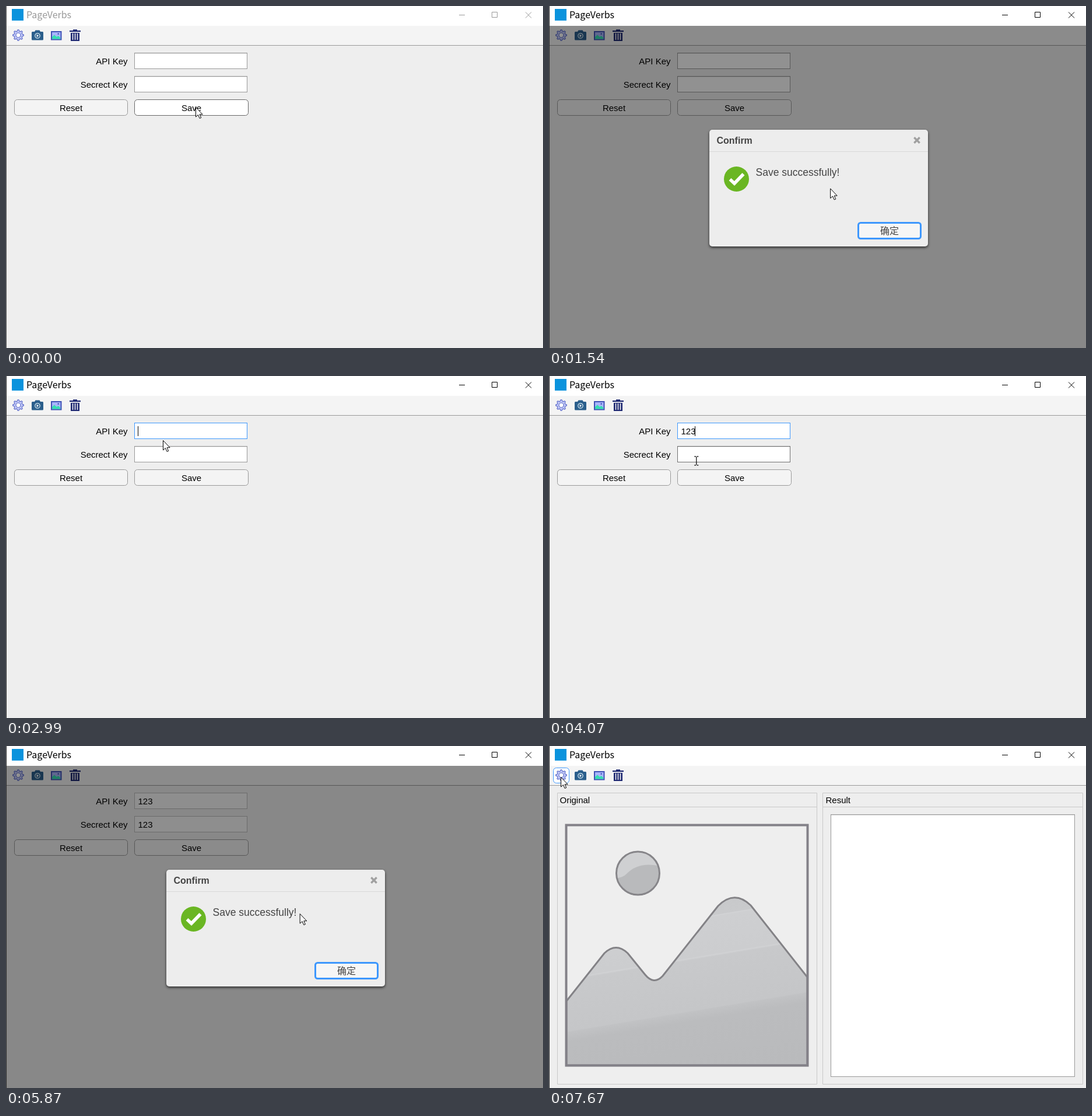
These frames come from a looping animation (921 by 586 pixels, 8 s). An HTML page:

```html
<!DOCTYPE html>
<html lang="en">
<head>
<meta charset="utf-8">
<title>PageVerbs</title>
<style>
  html, body { margin: 0; width: 100%; height: 100%; overflow: hidden; background: #eee; }
  svg { display: block; width: 100%; height: 100%; }
  text { font: 15px "Liberation Sans", Arial, sans-serif; fill: #000; white-space: pre; }
  .title { font: 16px "Noto Sans CJK SC", "Noto Sans CJK", "Noto Sans", sans-serif; }
  .mid { text-anchor: middle; }
  .end { text-anchor: end; }
  #dialog text { fill: #444; }
  #dialog .head { font-size: 16px; font-weight: bold; }
  #dialog .msg { font-size: 17.5px; }
  #dialog .ok { font: 16px "Noto Sans CJK SC", "Noto Sans CJK", sans-serif; }
  #dialog .box { filter: drop-shadow(0 2px 2px rgba(0, 0, 0, .7)); }
  .group { fill: none; stroke: #c8c8c8; }
</style>
</head>
<body>
<svg viewBox="0 0 921 586" xmlns="http://www.w3.org/2000/svg">
  <defs>
    <linearGradient id="hill" gradientUnits="userSpaceOnUse" x1="0" y1="260" x2="57.8" y2="610.5">
      <stop offset="0" stop-color="#c5c6c8"/>
      <stop offset=".21" stop-color="#c9cacc"/>
      <stop offset=".214" stop-color="#d2d3d5"/>
      <stop offset=".22" stop-color="#cecfd1"/>
      <stop offset=".395" stop-color="#cccdcf"/>
      <stop offset=".4" stop-color="#d1d2d4"/>
      <stop offset=".408" stop-color="#c8c9cb"/>
      <stop offset=".65" stop-color="#c5c6c8"/>
      <stop offset=".655" stop-color="#c1c2c4"/>
      <stop offset=".7" stop-color="#bbbcbe"/>
      <stop offset="1" stop-color="#b9babc"/>
    </linearGradient>
    <clipPath id="disc"><circle cx="152.5" cy="218" r="37"/></clipPath>
  </defs>

  <rect width="921" height="586" fill="#eee"/>
  <rect width="921" height="34" fill="#fff"/>
  <rect y="34" width="921" height="33" fill="#f4f4f4"/>
  <path d="M0 67.5H921" stroke="#999"/>
  <rect x="10" y="5" width="20" height="20" fill="#0a93dd"/>
  <text id="title" class="title" x="35" y="21">PageVerbs</text>
  <path id="controls" d="M777 15.5H787M833.5 10.5H842.5V19.5H833.5ZM891 10.5L901 20.5M901 10.5L891 20.5" fill="none"/>

  <g id="tools">
    <rect id="gearBox" x="7.5" y="37.5" width="27" height="26" rx="5" fill="#fff"/>
    <path id="gear" fill="#c5cbf9" stroke="#5c6bc8" stroke-width="1.2" stroke-linejoin="round"/>
    <circle cx="21" cy="50" r="4" fill="#fff" stroke="#5c6bc8" stroke-width="1.2"/>
    <path d="M45.5 44H49L50.5 41.5H57.5L59 44H62.5Q64 44 64 45.5V57Q64 58.5 62.5 58.5H45.5Q44 58.5 44 57V45.5Q44 44 45.5 44Z" fill="#2b5f8c"/>
    <circle cx="54" cy="51" r="4.2" fill="#2b5f8c" stroke="#d5e9f2" stroke-width="1.3"/>
    <path d="M52.7 48.8L56.3 51L52.7 53.2Z" fill="#fff"/>
    <rect x="77" y="43" width="18.5" height="15.5" fill="#3f51b5"/>
    <rect x="79" y="45" width="14.5" height="11.5" fill="#a9b5fb"/>
    <path d="M79 56.5V53L83 49.5L87 53L89.5 51L93.5 54.5V56.5Z" fill="#35dfb0"/>
    <circle cx="89.7" cy="47.7" r="1.3" fill="#3f51b5"/>
    <path d="M109 42H115V40.3H122V42H128V44.2H109ZM111 46H126V60H111Z" fill="#1e2872"/>
    <path d="M114.5 47V58M118.5 47V58M122.5 47V58" stroke="#f4f4f4" stroke-width="1.6"/>
  </g>

  <g id="form">
    <text class="end" x="208.5" y="100">API Key</text>
    <text class="end" x="208.5" y="140">Secrect Key</text>
    <g id="fields"></g>
    <rect x="14.5" y="160.5" width="194" height="27" rx="5" fill="#f4f4f4" stroke="#999"/>
    <text class="mid" x="111.5" y="180">Reset</text>
    <rect id="save" x="220.5" y="160.5" width="195" height="27" rx="5"/>
    <text class="mid" x="318" y="180">Save</text>
  </g>

  <g id="panels">
    <path class="group" d="M14.5 80.5H459.5V579.5H14.5ZM14.5 104.5H459.5M469.5 80.5H915.5V579.5H469.5ZM469.5 104.5H915.5"/>
    <text x="18.5" y="98">Original</text>
    <text x="474.5" y="98">Result</text>
    <rect x="483.5" y="117.5" width="418" height="449" fill="#fff" stroke="#999"/>
    <path d="M484 118.5H901" stroke="#e2e2e2"/>
    <path d="M30 437L95 355Q115 336 135 355L165 392Q180 410 195 394L290 274Q318 246 346 273L443 396V547H30Z"
      fill="url(#hill)" stroke="#838286" stroke-width="3"/>
    <circle cx="152.5" cy="218" r="37" fill="#b9babc"/>
    <path d="M110 170H195V207Q155 196 133 219Q127 226 110 227Z" fill="#cfd0d2" clip-path="url(#disc)"/>
    <circle cx="152.5" cy="218" r="37" fill="none" stroke="#868589" stroke-width="3"/>
    <rect x="29.5" y="135.5" width="414" height="412" fill="none" stroke="#838188" stroke-width="4"/>
  </g>

  <g id="dialog">
    <rect x="1" y="34" width="920" height="552" opacity=".43"/>
    <rect class="box" x="275" y="212" width="375" height="200" rx="5" fill="#ededed"/>
    <path d="M275 249.5H650" stroke="#d8d8d8"/>
    <text class="head" x="287.5" y="236">Confirm</text>
    <path d="M626.3 225.3L635.7 234.7M635.7 225.3L626.3 234.7" stroke="#a0a0a0" stroke-width="3.4"/>
    <circle cx="321.5" cy="296.5" r="21.5" fill="#6ab623"/>
    <path d="M310.5 297L318 304L333.5 288" fill="none" stroke="#fff" stroke-width="5.6"/>
    <text class="msg" x="354.5" y="291">Save successfully!</text>
    <rect x="530.5" y="371.5" width="107" height="27" rx="4" fill="#f6f6f6" stroke="#3d97fd" stroke-width="3"/>
    <text class="ok mid" x="584" y="391">确定</text>
  </g>

  <path id="edge" d="M.5 0V586"/>
  <g id="pointer">
    <path id="arrow" d="M0 0V16.5L3.9 13L6.6 19L9.2 18L6.6 12.2H11.6Z" fill="#fff" stroke="#000"/>
    <path id="beam" d="M-3.5 -7.5H-.8M.8 -7.5H3.5M0 -7V7M-3.5 7.5H-.8M.8 7.5H3.5" fill="none" stroke="#000" stroke-width="1.2"/>
  </g>
</svg>
<script>
const LOOP = 8000, HOLD = 280, STEP = 90, LAST = 7670;
const BLUE = '#3d97fd';
const $ = id => document.getElementById(id);
const set = (el, attrs) => { for (const k in attrs) el.setAttribute(k, attrs[k]); };
const show = (el, on) => set(el, { display: on ? 'inline' : 'none' });
const within = (t, a, b) => t >= a && t < b;

// pointer way points: time, x, y
const PATH = [
  [0, 325.5, 173.5], [280, 325.5, 173.5], [910, 329.5, 175.5], [1180, 329.5, 175.5],
  [1450, 450, 290], [1810, 580.5, 381.5], [1900, 580.5, 380.5], [1990, 579.5, 377.5],
  [2260, 370, 200], [2440, 268.5, 98.5], [2620, 269.5, 110.5], [3530, 269.5, 110.5],
  [4070, 252.5, 146], [4250, 274.5, 142], [4880, 274.5, 142], [5150, 300.5, 191.5],
  [5510, 330.5, 179.5], [5690, 345.5, 186.5], [5870, 513.5, 293.5], [6050, 548.5, 355.5],
  [6320, 549.5, 380.5], [6590, 549.5, 380.5], [6680, 529.5, 324.5], [7040, 240.5, 160.5],
  [7310, 30.5, 60.5], [7400, 20.5, 53.5]
];
const FIELDS = [
  { y: 80, keys: [2990, 3170, 3440], focus: [2440, 4160] },
  { y: 120, keys: [4430, 4700, 4880], focus: [4160, 5510] }
];
const DIALOGS = [[1180, 1900], [5690, 6590]];
const HIDDEN = [[2990, 3620], [4430, 4970]];
const LOCKED = 5690, PANELS = 7580;

function gearPath(cx, cy, teeth) {
  let d = '';
  for (let i = 0; i < teeth * 4; i++) {
    const a = (i - .5) / (teeth * 4) * Math.PI * 2, r = i % 4 < 2 ? 9.3 : 7;
    d += (i ? 'L' : 'M') + (cx + r * Math.cos(a)).toFixed(2) + ' ' + (cy + r * Math.sin(a)).toFixed(2);
  }
  return d + 'Z';
}

function make(tag, attrs) {
  const el = document.createElementNS('http://www.w3.org/2000/svg', tag);
  set(el, attrs);
  return $('fields').appendChild(el);
}

set($('gear'), { d: gearPath(21, 50, 8) });
for (const f of FIELDS) {
  f.box = make('rect', { x: 220.5, y: f.y + .5, width: 193, height: 27 });
  f.shade = make('path', { d: `M221 ${f.y + 1.5}H413`, stroke: '#e2e2e2' });
  f.text = make('text', { x: 226.5, y: f.y + 20 });
  f.caret = make('path', { d: `M0 ${f.y + 6}v17`, stroke: '#000' });
}

function pointerAt(t) {
  const i = PATH.findIndex(p => p[0] > t);
  if (i < 0) return PATH[PATH.length - 1].slice(1);
  const [a, b] = [PATH[i - 1], PATH[i]], k = (t - a[0]) / (b[0] - a[0]);
  return [1, 2].map(n => a[n] + (b[n] - a[n]) * k);
}

function render(ms) {
  const t = ms < HOLD ? 0 : Math.min(LAST, HOLD + Math.floor((ms - HOLD) / STEP) * STEP);
  const [px, py] = pointerAt(t);
  const modal = DIALOGS.some(d => within(t, ...d));
  const over = (x, y, w, h) => !modal && px >= x && px <= x + w && py >= y && py <= y + h;
  const active = t >= 910, main = t >= PANELS, locked = t >= LOCKED;

  set($('title'), { style: `fill:${active ? '#000' : '#999'}` });
  set($('controls'), { stroke: active ? '#000' : '#999' });
  set($('edge'), { stroke: active ? '#2b2b2b' : '#555' });
  show($('form'), !main);
  show($('panels'), main);
  show($('dialog'), modal);

  let beam = false;
  for (const f of FIELDS) {
    const hover = !locked && over(220, f.y, 194, 28);
    const focus = within(t, ...f.focus);
    const count = f.keys.filter(k => t >= k).length;
    beam = beam || hover;
    set(f.box, {
      fill: locked ? '#f9f9f9' : '#fff',
      stroke: focus ? BLUE : locked ? '#bbb' : hover ? '#707070' : '#999'
    });
    show(f.shade, !focus && !locked);
    f.text.textContent = '123'.slice(0, count);
    show(f.caret, focus);
    set(f.caret, { transform: `translate(${Math.floor(226 + count * 8.34) - .5 + (count ? 0 : 1)})` });
  }

  const onSave = over(220, 160, 196, 28);
  const saveFocus = within(t, 910, 1180) || within(t, 5510, 5690);
  set($('save'), {
    fill: saveFocus ? '#fafafa' : onSave ? '#fff' : '#f4f4f4',
    stroke: saveFocus ? BLUE : onSave ? '#666' : '#999'
  });

  show($('gearBox'), over(7, 37, 28, 27));
  set($('gearBox'), { stroke: t >= 7490 ? BLUE : '#666' });

  show($('pointer'), !HIDDEN.some(h => within(t, ...h)));
  set($('pointer'), { transform: `translate(${px} ${py})` });
  show($('arrow'), !beam);
  show($('beam'), beam);
}

const start = performance.now();
function tick() {
  render((performance.now() - start) % LOOP);
  requestAnimationFrame(tick);
}
tick();
</script>
</body>
</html>
```
